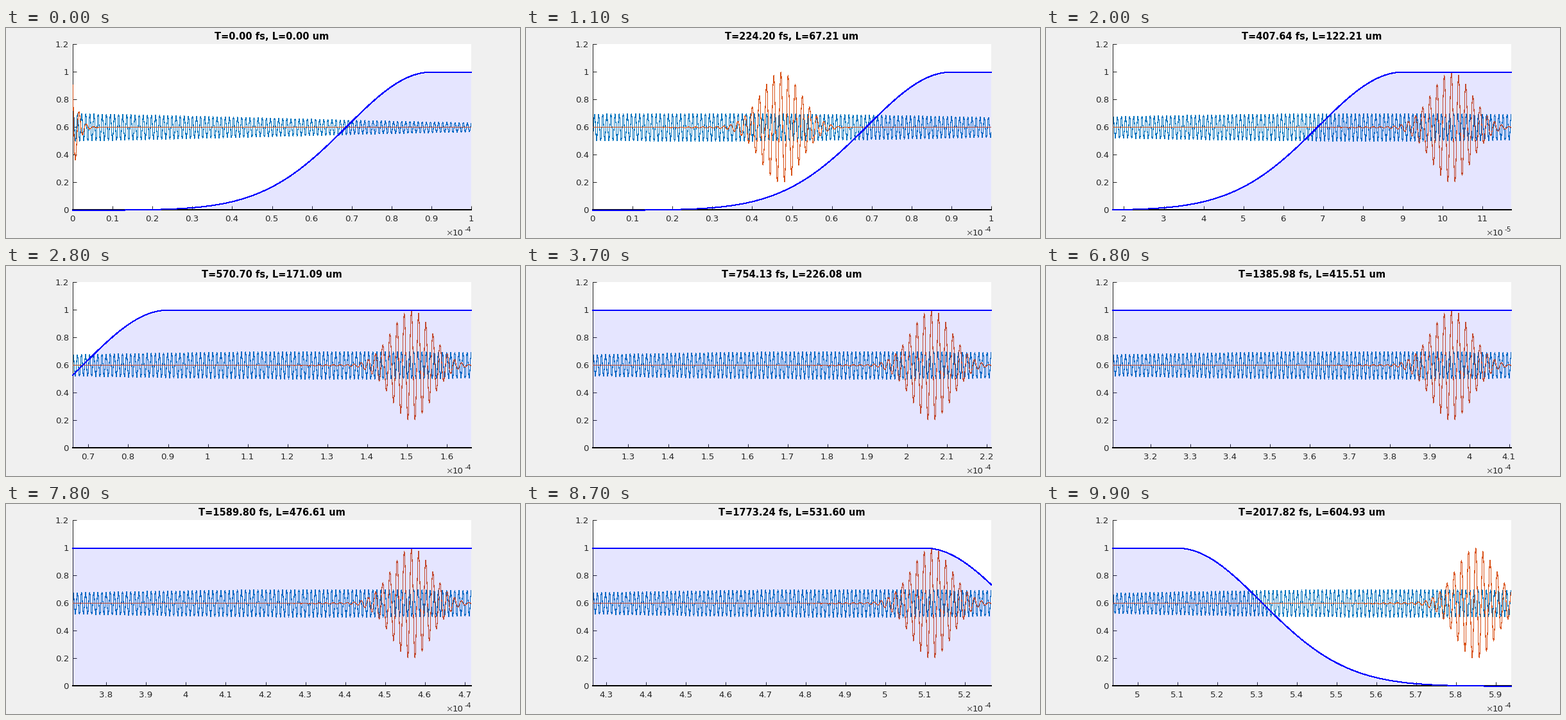
A matplotlib script for the animation above (10 s loop, 801 px wide and 327 px high).

```python
import numpy as np
import matplotlib.pyplot as plt
from matplotlib.animation import FuncAnimation
from matplotlib.transforms import Affine2D

W, H, DPI = 801, 327, 100
PX = 72 / DPI                      # points per pixel
X0, X1, Y0, Y1 = 104.13, 724.9, 25.2, 283.3
FRAMES, INTERVAL = 100, 100
DT, C = 20.38202, 0.299792458      # fs per frame, um per fs
SPAN, LEAD, END = 100, 5, 600      # um
INK = (0.15, 0.15, 0.15)

plt.rcParams["font.family"] = "DejaVu Sans"
plt.rcParams["path.simplify"] = False
fig = plt.figure(figsize=(W / DPI, H / DPI), dpi=DPI, facecolor="#f0f0f0")
ax = fig.add_axes([X0 / W, 1 - Y1 / H, (X1 - X0) / W, (Y1 - Y0) / H])
ax.set_ylim(0, 1.2)
ax.set_yticks(np.arange(7) * 0.2)
ax.tick_params(direction="in", length=6 * PX, width=PX, color=INK,
               labelbottom=False, labelleft=False)
for side, spine in ax.spines.items():
    spine.set_visible(side in ("left", "bottom"))
    spine.set(color=INK, linewidth=PX)

# Curves sit on pixel centres.
on_pixels = ax.transData + Affine2D().translate(0, -0.5)


def label(x, y, text="", size=13.33, **kw):
    """Text at pixel (x, y), measured from the top left corner."""
    kw = {"ha": "center", "va": "baseline", "color": INK, **kw}
    return fig.text(x / W, 1 - y / H, text, fontsize=size * PX, **kw)


def curve(color, width, z):
    """Hard-edged curve; every touched pixel is painted, so width runs low."""
    return ax.plot([], [], color=color, lw=width * PX, zorder=z, snap=False,
                   antialiased=False, clip_on=False, transform=on_pixels)[0]


def pulse(x, centre, width, wavelength):
    """Gaussian wave packet scaled to its highest envelope inside x >= 0."""
    top = min(centre, 0) ** 2
    env = np.exp((top - (x - centre) ** 2) / width ** 2)
    return env * np.cos(2 * np.pi * (x - centre) / wavelength)


def density(x):
    edge = np.maximum(0, np.abs(x - END / 2) - 210)
    return np.exp(-(edge / 30) ** 2)


def window_start(n):
    last = int(END / (C * DT))
    return max(0, C * DT * min(n, last) - LEAD - SPAN)


for k in range(7):
    label(98, Y1 - k * (Y1 - Y0) / 6 + 4.7, f"{k * 0.2:.1f}".replace(".0", ""), ha="right")
title = label((X0 + X1) / 2, 18, size=14.67, weight="bold", color="black")
label(713, 323, "10", ha="right")
label(696, 323, "×", ha="right", color="#555555")
power = label(725, 317, size=10.67, ha="right")
names = [label(0, 301.3) for _ in range(11)]

pump = curve("#0072bd", 0.1, 2)
signal = curve("#d95319", 0.1, 3)
profile = curve("blue", 1, 6)
ax.plot([0, 1], [0, 0], color="black", lw=2 * PX, zorder=5,
        antialiased=False, clip_on=False, transform=ax.transAxes)
fill = ax.fill([0, 1, 1], [0, 0, 1], color="blue", alpha=0.1, lw=0, zorder=4)[0]


def update_axis(lo):
    hi = lo + SPAN
    small = lo > 0 and lo * hi < 100 ** 2
    power.set_text("-5" if small else "-4")
    ticks = [t for t in range(0, END + 1, 10) if lo <= t <= hi]
    ax.set_xlim(lo, hi)
    ax.set_xticks(ticks)
    for i, text in enumerate(names):
        text.set_visible(i < len(ticks))
        if i < len(ticks):
            text.set_x((X0 - 0.4 + (ticks[i] - lo) / SPAN * (X1 - X0)) / W)
            text.set_text(f"{ticks[i] / (10 if small else 100):g}")


def update(n):
    t = n * DT
    front = C * t
    lo = window_start(n)
    x = np.linspace(lo, lo + SPAN, 3001)
    rho = density(x)
    ripple = 0.004 * np.exp(-((x - front + 40) / 8) ** 2) * np.cos(2 * np.pi * (x - front) / 1.8)

    update_axis(lo)
    title.set_text(f"T={t:.2f} fs, L={front:.2f} um")
    pump.set_data(x, 0.6 + 0.1 * pulse(x, front - 40, 127.3, 1.03))
    signal.set_data(x, 0.6 + 0.4 * pulse(x, front - 20, 7.2, 1.8) + ripple)
    profile.set_data(x, rho)
    fill.set_xy(np.column_stack([np.r_[lo, x, lo + SPAN], np.r_[0, rho, 0]]))
    return []


anim = FuncAnimation(fig, update, frames=FRAMES, interval=INTERVAL,
                     repeat=True, repeat_delay=0, blit=False)
plt.show()
```
